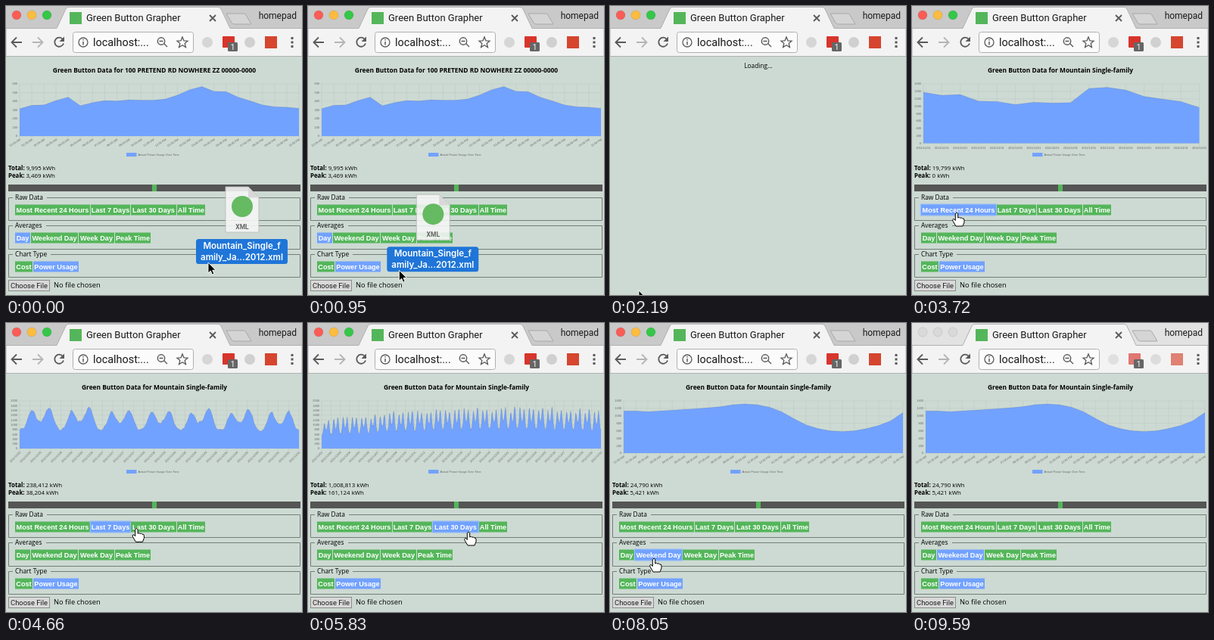
Animation, 391 px wide and 382 px high, one loop 9690 ms. Source, as an HTML page:

```html
<!DOCTYPE html>
<html lang="en">
<head>
<meta charset="utf-8">
<title>Green Button Grapher</title>
<style>
  html, body { margin: 0; width: 100%; height: 100%; overflow: hidden; background: #cddad3; }
  svg { display: block; width: 100%; height: 100%; }
  text { font-family: "Open Sans", sans-serif; font-size: 8.4px; fill: #000; white-space: pre; }
  .ui { font-family: Roboto, sans-serif; font-size: 13px; fill: #1a1a1a; }
  .bold { font-weight: 700; }
  .stat { font-size: 7.9px; }
  .button { font: 700 9.14px "Liberation Sans", sans-serif; fill: #fff; }
  .tick { font: 3.9px "Liberation Sans", sans-serif; fill: #666; }
  .file { font: 600 11.5px Inter, sans-serif; fill: #fff; }
  .icon { fill: none; stroke: #5a5a5a; stroke-width: 1.8; }
</style>
</head>
<body>
<svg viewBox="0 0 391 382">
  <g id="page"></g>
  <g id="browser">
    <rect id="strip" width="391" height="30" fill="#c9c9c9"/>
    <g id="lights"></g>
    <path d="M291 10H314Q316 10 317 12L324 24H302Q299 24 298 22Z" fill="#d5d5d5" stroke="#a8a8a8"/>
    <text class="ui" x="384" y="17" text-anchor="end" style="font-size:12px">homepad</text>
    <path d="M0 29.5H67L79 4Q80 1.5 83 1.5H280Q283 1.5 284 4L296 29.5H391V66.5H0Z" fill="#f3f3f3" stroke="#b0b0b0"/>
    <rect x="84" y="8" width="16" height="16" fill="#54b65a"/>
    <text class="ui" x="106" y="20">Green Button Grapher</text>
    <path class="icon" d="M269 12l8 8m0-8l-8 8"/>
    <path class="icon" d="M21 48H8m6-6.5l-6.5 6.5 6.5 6.5"/>
    <path class="icon" d="M35 48H48m-6-6.5l6.5 6.5-6.5 6.5" style="stroke:#b5b5b5"/>
    <path class="icon" d="M75 44A6 6 0 1 0 76 49.5"/>
    <path d="M77 40.5V47H70.5Z" fill="#5a5a5a"/>
    <rect x="88.5" y="34.5" width="159" height="27" rx="3" fill="#fbfbfb" stroke="#b0b0b0"/>
    <circle class="icon" cx="102" cy="48" r="6" style="stroke-width:1.3"/>
    <path class="icon" d="M102 47v4.5M102 44v1.5" style="stroke-width:1.5"/>
    <text class="ui" x="115" y="53" style="font-size:14.4px">localhost:...</text>
    <path class="icon" d="M208.5 49.5l4.5 4.5M202.5 46.5h5" style="stroke-width:1.4"/>
    <circle class="icon" cx="205" cy="46.5" r="4.7" style="stroke-width:1.4"/>
    <path class="icon" d="M233 41l2 4.8 5 .4-3.8 3.3 1.2 5-4.4-2.7-4.4 2.7 1.2-5-3.8-3.3 5-.4z" style="stroke-width:1.3"/>
    <g id="extensions">
      <circle cx="266" cy="48" r="7" fill="#d6d6d6"/>
      <rect x="286" y="40" width="16" height="15" rx="1" fill="#d7352c"/>
      <circle cx="322" cy="48" r="7" fill="#d0d0d0"/>
      <rect x="342" y="40" width="16" height="16" fill="#d5452f"/>
    </g>
    <rect x="293" y="48" width="13" height="12" rx="1.5" fill="#666"/>
    <text class="ui" x="299.5" y="58" text-anchor="middle" style="font-size:10px;fill:#fff">1</text>
    <path d="M376.5 41h3v3h-3zM376.5 46.5h3v3h-3zM376.5 52h3v3h-3z" fill="#5a5a5a"/>
  </g>
  <g id="drag">
    <path d="M23-100H53L67-86V-40H23Z" fill="#f6f6f6" fill-opacity=".88" stroke="#b8b8b8" stroke-width=".8"/>
    <path d="M53-100V-86H67Z" fill="#d8d8d8"/>
    <circle cx="45" cy="-74" r="14" fill="#56b452" fill-opacity=".9"/>
    <text class="ui" x="45" y="-44" text-anchor="middle" style="font-size:8.5px;font-weight:700;fill:#666">XML</text>
    <rect x="-16" y="-31" width="121" height="33" rx="3.5" fill="#1f75d8"/>
    <text class="file" x="44.5" y="-18" text-anchor="middle">Mountain_Single_f</text>
    <text class="file" x="44.5" y="-3" text-anchor="middle">amily_Ja...2012.xml</text>
  </g>
  <path id="arrow" d="M0 0V14L3.3 11 5.5 16 7.8 15 5.7 10.2H10Z" fill="#000" stroke="#fff" stroke-width=".9"/>
  <path id="hand" d="M-1.7 1.5Q0-1 1.7 1.5V7Q3.5 5.5 4.7 7.2 6.5 6 7.5 8 10 7.2 10 10V13L8 18H-1L-4.8 11.5Q-6 9 -4.5 8.5 -3 8.2 -1.7 10.5Z" fill="#fff" stroke="#000"/>
</svg>
<script>
const LOOP = 9690;
const GREEN = '#54b65a', BLUE = '#72a2ff';
const $ = id => document.getElementById(id);
const pad = n => String(n).padStart(2, '0');
const series = (count, fn) => Array.from({ length: count }, (_, i) => fn(i));
const noise = n => { const s = Math.sin(n * 127.1) * 43758.5453; return s - Math.floor(s); };

const text = (x, y, value, cls = '', extra = '') => `<text x="${x}" y="${y}" class="${cls}" ${extra}>${value}</text>`;
const rect = (x, y, w, h, fill, extra = '') => `<rect x="${x}" y="${y}" width="${w}" height="${h}" fill="${fill}" ${extra}/>`;

// Button groups: legend, top and bottom of the frame, legend end, then [label, left, right]
const groups = [
  ['Raw Data', 253.5, 283.5, 54, [['Most Recent 24 Hours', 12, 111], ['Last 7 Days', 112, 164], ['Last 30 Days', 165, 225], ['All Time', 226, 263]]],
  ['Averages', 290.5, 321.5, 53, [['Day', 12, 32], ['Weekend Day', 33, 95], ['Week Day', 96, 143], ['Peak Time', 144, 191]]],
  ['Chart Type', 328.5, 358.5, 59, [['Cost', 12, 35], ['Power Usage', 36, 96]]]
];

// Household load with a morning and an evening peak; day may be fractional
function load(day, low, swing) {
  const phase = day % 1;
  const peak = (center, width) => Math.exp(-(((phase - center) / width) ** 2));
  const shape = .9 * peak(.3, .12) + peak(.75, .13) + .35 * (.5 - .5 * Math.cos(2 * Math.PI * phase));
  return low + swing * shape * (.8 + .25 * noise(Math.floor(day * 2))) + 90 * noise(day * 24);
}
function monthLoad(day) {
  const rise = Math.sin(Math.PI * day / 40);
  return load(day, 520 + 250 * rise, 560 + 250 * rise);
}
function yearLoad(i) {
  const winter = Math.cos(i / 730 * Math.PI) ** 2;
  return load(i / 4, 480 + 180 * winter, 480 + 420 * winter);
}

const hours = series(24, h => `${pad(h % 12 || 12)}:00 ${h < 12 ? 'AM' : 'PM'}`);
const weekend = [1132, 1132, 1112, 1132, 1153, 1174, 1194, 1215, 1246, 1297, 1318, 1297,
  1235, 1112, 926, 762, 659, 597, 576, 597, 659, 741, 865, 1091];
const mountain = 'Mountain Single-family';

// bottom: y of the zero line; angle: slant of the x labels
const charts = {
  home: { owner: '100 PRETEND RD NOWHERE ZZ 00000-0000', total: '9,995', peak: '3,469', max: 600, step: 100, bottom: 172, angle: -32, labels: hours,
    data: [315, 354, 358, 408, 448, 350, 385, 408, 404, 417, 412, 412, 426, 472, 533, 569, 515, 511, 448, 404, 358, 338, 332, 320] },
  day: { total: '24,318', peak: '5,306', max: 1400, step: 200, bottom: 172, angle: -32, labels: hours, data: weekend.map(v => v * .98) },
  recent: { total: '19,799', peak: '0', max: 1600, step: 200, bottom: 181.5, angle: 0, labels: Array(16).fill('2011/12/31'),
    data: [1374, 1292, 1313, 1138, 1128, 1046, 1108, 1087, 1097, 1477, 1508, 1436, 1262, 1190, 1128, 964] },
  week: { total: '238,412', peak: '38,204', max: 2000, step: 200, bottom: 166, angle: -45,
    labels: series(28, i => '2011/12/' + (25 + Math.floor(i / 4))), data: series(169, i => monthLoad(23 + i / 24)) },
  month: { total: '1,008,813', peak: '161,124', max: 2000, step: 200, bottom: 166, angle: -45,
    labels: series(31, i => '2011/12/' + pad(i + 1)), data: series(721, i => monthLoad(i / 24)) },
  year: { total: '8,876,070', peak: '1,936,690', max: 2000, step: 200, bottom: 166, angle: -45,
    labels: series(31, i => `2011/${pad(1 + Math.floor(i * 12 / 31))}/${pad(1 + i * 12 % 28)}`), data: series(1460, yearLoad) },
  peak: { total: '5,306', peak: '5,306', max: 1200, step: 200, bottom: 181.5, angle: 0, labels: hours.slice(13, 20),
    data: [1138, 923, 754, 654, 600, 585, 600] },
  weekend: { total: '24,790', peak: '5,421', max: 1400, step: 200, bottom: 172, angle: -32, labels: hours, data: weekend }
};

// [start, chart, selected button]
const scenes = [
  [0, 'home', 'Day'], [2190, null], [2490, 'day', 'Day'], [3300, 'recent', 'Most Recent 24 Hours'],
  [4310, 'week', 'Last 7 Days'], [5130, 'month', 'Last 30 Days'], [6270, 'year', 'All Time'],
  [6770, 'peak', 'Peak Time'], [8050, 'weekend', 'Weekend Day']
];
// [mouse down, focused button]
const focuses = [
  [0, ''], [3200, 'Most Recent 24 Hours'], [4140, 'Last 7 Days'], [5070, 'Last 30 Days'],
  [6050, 'All Time'], [6710, 'Peak Time'], [7930, 'Weekend Day'], [9590, '']
];
// [leave, arrive, x, y]
const moves = [
  [0, 0, 38, 376], [2490, 3200, 59, 273], [3720, 4140, 141, 272], [4480, 4770, 187, 271],
  [5130, 5360, 214, 273], [5540, 5590, 212, 276], [5830, 6050, 256, 276], [6270, 6560, 172, 313],
  [6710, 7120, 167, 311], [7230, 7630, 62, 312], [7630, 7690, 58, 311], [8950, 9300, 350, 386]
];
const current = (list, t) => list.filter(item => item[0] <= t).pop();

function drawChart({ max, step, bottom, angle, labels, data }) {
  const left = angle ? 18 : 15, width = (angle ? 387 : 379.5) - left;
  const xOf = (i, count) => left + width * i / (count - 1);
  const yOf = v => bottom - (bottom - 103) * v / max;
  let grid = '', out = '';
  for (let v = 0; v <= max; v += step) {
    grid += `M${left - 3} ${yOf(v)}H${left + width}`;
    out += text(left - 3, yOf(v) + 1.4, v, 'tick', 'text-anchor="end"');
  }
  labels.forEach((label, i) => {
    const x = xOf(i, labels.length);
    grid += `M${x} 103V${bottom + 3}`;
    out += angle
      ? text(x + 1, bottom + 5.5, label, 'tick', `text-anchor="end" transform="rotate(${angle} ${x + 1} ${bottom + 4.5})"`)
      : text(x, bottom + 7.5, label, 'tick', 'text-anchor="middle"');
  });
  const line = data.map((v, i) => `${xOf(i, data.length).toFixed(2)} ${yOf(v).toFixed(2)}`).join('L');
  return `<path d="${grid}" stroke="#000" stroke-opacity=".08" stroke-width=".6"/>
    <path d="M${line}V${bottom}H${left}Z" fill="${BLUE}"/>
    <path d="M${line}" fill="none" stroke="#000" stroke-opacity=".12" stroke-width=".8"/>${out}`
    + rect(159, 194, 13.5, 5, BLUE) + text(174.5, 198, 'Actual Power Usage Over Time', 'tick');
}

function drawGroup([legend, top, bottom, legendEnd, buttons], selected, focused) {
  let out = `<path d="M9 ${top}H3.5V${bottom}H388.5V${top}H${legendEnd}" fill="none" stroke="#757d79"/>`
    + text(12, top + 2.5, legend);
  for (const [label, x1, x2] of buttons) {
    const blue = label === selected || label === 'Power Usage';
    const ring = label === focused ? 'stroke="#9fc3f2" stroke-width="2.4" paint-order="stroke"' : '';
    out += rect(x1, top + 9, x2 - x1, 14, blue ? BLUE : GREEN, ring)
      + text((x1 + x2) / 2, top + 19.5, label, 'button', 'text-anchor="middle"');
  }
  return out;
}

function drawPage(chartName, selected, focused) {
  if (!chartName) return text(196, 82, 'Loading...', '', 'text-anchor="middle"');
  const chart = charts[chartName];
  const stat = (y, name, value) => text(3, y, `<tspan class="bold">${name}:</tspan> ${value} kWh`, 'stat');
  return text(196, 88, 'Green Button Data for ' + (chart.owner || mountain), 'bold', 'text-anchor="middle"')
    + drawChart(chart) + stat(217, 'Total', chart.total) + stat(227, 'Peak', chart.peak)
    + rect(3, 236, 386, 9, '#555') + rect(193, 236, 6, 9, GREEN)
    + groups.map(group => drawGroup(group, selected, focused)).join('')
    + rect(3.5, 362.5, 54, 14, '#d9d9d9', 'stroke="#8c8c8c"')
    + text(30.5, 373, 'Choose File', 'ui', 'text-anchor="middle" style="font-size:9.4px"')
    + text(63, 372, 'No file chosen', '', 'style="font-size:9.3px"');
}

function drawWindow(active) {
  $('strip').setAttribute('fill', active ? '#c9c9c9' : '#e2e2e2');
  $('extensions').setAttribute('opacity', active ? 1 : .65);
  const colors = active ? ['#fa5c56', '#fcbc3f', '#34c748'] : Array(3).fill('#d9d9d9');
  $('lights').innerHTML = colors.map((color, i) =>
    `<circle cx="${14 + 20 * i}" cy="12" r="6" fill="${color}" stroke="#000" stroke-opacity=".12" stroke-width=".7"/>`).join('');
}

function pointerAt(t) {
  if (t < 1720) {
    const k = Math.min(1, Math.max(0, (t - 470) / 950));
    return [267 - 229 * (1 - (1 - k) ** 1.45), 339 + 37 * k ** 1.9];
  }
  const index = moves.findLastIndex(move => move[0] <= t);
  const [start, end, x, y] = moves[index];
  const [, , fromX, fromY] = moves[Math.max(0, index - 1)];
  const k = end > start ? Math.min(1, (t - start) / (end - start)) : 1;
  const ease = k * k * (3 - 2 * k);
  return [fromX + (x - fromX) * ease, fromY + (y - fromY) * ease];
}

const overButton = (x, y) => groups.some(([, top, , , buttons]) =>
  y > top + 8 && y < top + 24 && buttons.some(([, x1, x2]) => x >= x1 - 1 && x <= x2));

function place(id, visible, [x, y]) {
  $(id).setAttribute('visibility', visible ? 'visible' : 'hidden');
  $(id).setAttribute('transform', `translate(${x.toFixed(1)} ${y.toFixed(1)})`);
}

let drawn = '';
function frame(now) {
  const t = now % LOOP;
  const [, chart, selected] = current(scenes, t);
  const focused = current(focuses, t)[1];
  const active = t < 9590;
  const key = [chart, focused, active].join();
  if (key !== drawn) {
    drawn = key;
    $('page').innerHTML = drawPage(chart, selected, focused);
    drawWindow(active);
  }
  const pointer = pointerAt(t);
  const dragging = t < 1720, visible = t < 9300;
  const hand = !dragging && chart && overButton(...pointer);
  place('drag', dragging, pointer);
  place('hand', visible && hand, pointer);
  place('arrow', visible && !hand, pointer);
}

const began = performance.now();
function tick() {
  frame(performance.now() - began);
  requestAnimationFrame(tick);
}
tick();
</script>
</body>
</html>
```
